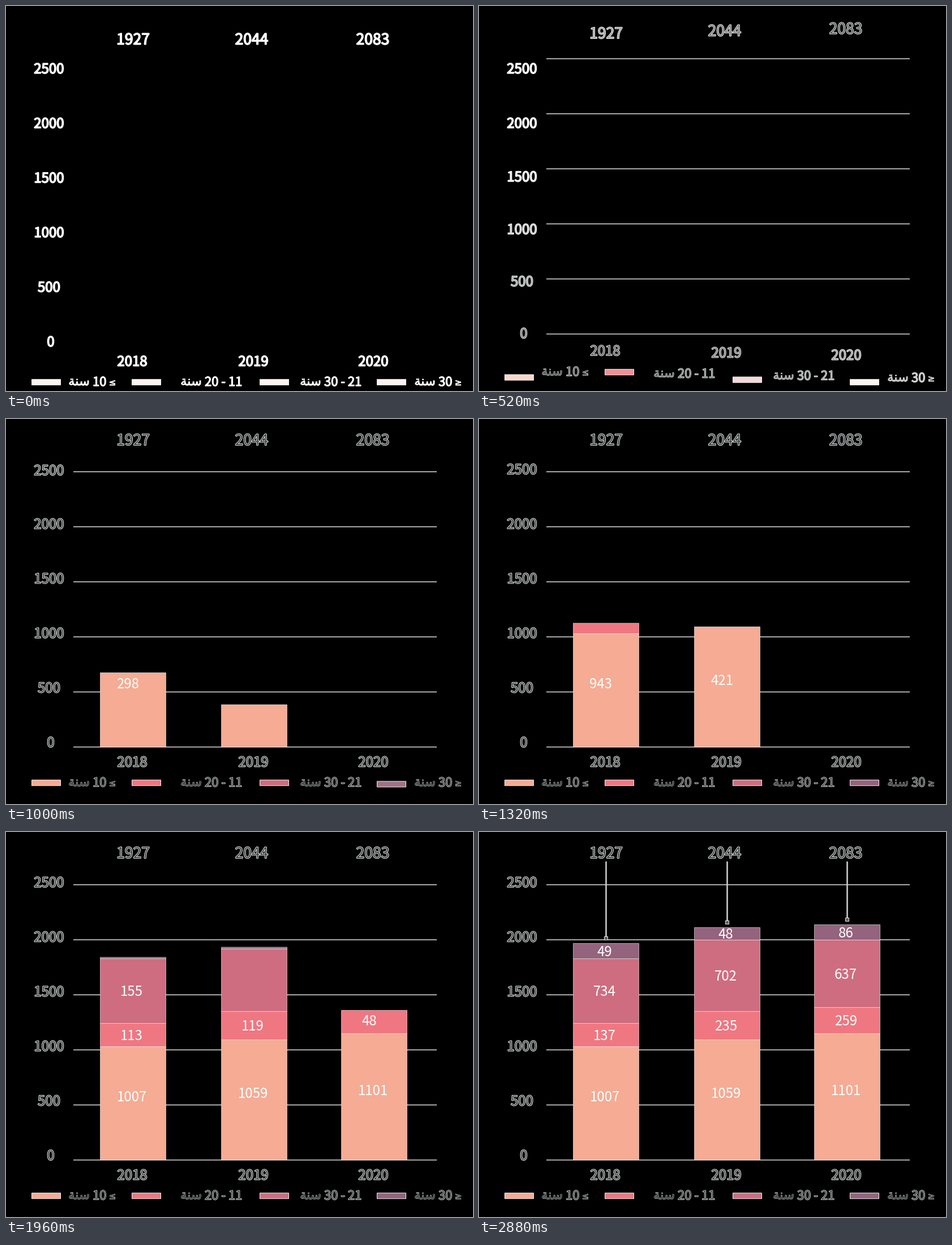
A matplotlib script for the animation above (3.88 s loop, 825 px wide and 679 px high).

```python
import matplotlib.pyplot as plt
from matplotlib.animation import FuncAnimation
from matplotlib.colors import to_rgb
from matplotlib.patches import Rectangle
from matplotlib.patheffects import withStroke
import numpy as np

W, H, DPI = 825, 679, 64
PX = 72 / DPI                  # points per pixel
STEP, FRAMES = 40, 97
RISE = 21.7                    # how far the captions slide up
BASE, GAP = 578.5, 97.1        # zero line and grid spacing
LATIN, ARABIC = "Noto Sans CJK JP", "DejaVu Sans"
YEARS = "\ufe94\ufee8\ufeb3"   # joined letter forms in visual order
INK = "#3e4343"
COLORS = ["#f5ab94", "#ef7781", "#cf6d80", "#94637d"]

fig = plt.figure(figsize=(W / DPI, H / DPI), dpi=DPI, facecolor="black")
ax = fig.add_axes([0, 0, 1, 1])
ax.set_xlim(0, W)
ax.set_ylim(H, 0)
ax.axis("off")


def ease(t, start, length):
    u = min(max((t - start) / length, 0), 1)
    return u * u * (3 - 2 * u)


def blend(a, b, p):
    return tuple((1 - p) * np.array(to_rgb(a)) + p * np.array(to_rgb(b)))


def stagger(first, last, power):
    """Four start times from first to last, bunched towards the end."""
    return first + (last - first) * (np.arange(4) / 3) ** power


def box(x, y, w, h, **style):
    return ax.add_patch(Rectangle((x, y), w, h, lw=PX, snap=False, **style))


def stroke(color, width, z):
    return ax.plot([], [], color=color, lw=width * PX, zorder=z,
                   solid_capstyle="butt", snap=False)[0]


class Grid:
    def __init__(self):
        self.lines = [stroke("#dedede", 1.5, 1) for _ in range(6)]

    def update(self, t):
        right = 119 + 642 * ease(t, 20, 500)
        for i, line in enumerate(self.lines):
            line.set_data([119, right], [BASE - GAP * i] * 2)
            line.set_visible(right > 119)


class Caption:
    """Outlined text that slides up while its fill darkens."""

    def __init__(self, x, mid, text, size, start, font=LATIN, ha="center", edge=1.7):
        self.y = mid + (size * 0.366 if font == LATIN else 7)
        self.start = start
        self.art = ax.text(
            x, self.y, text, family=font, size=size * PX, color="white",
            ha=ha, va="baseline", zorder=4,
            path_effects=[withStroke(linewidth=edge * PX, foreground="white")])

    def update(self, t):
        p = ease(t, self.start, 520)
        self.art.set_y(self.y - RISE * p)
        self.art.set_color(blend("white", INK, p))


class Swatch:
    """Legend key that slides up while it takes on its colour."""

    def __init__(self, x, color, start):
        self.y, self.color, self.start = 658.4, color, start
        self.art = box(x, self.y, 51, 10, ec="#f4eeee", zorder=4)

    def update(self, t):
        p = ease(t, self.start, 520)
        self.art.set_y(self.y - RISE * p)
        self.art.set_facecolor(blend("#fdf3f0", self.color, p))


class Bar:
    """Stack of segments growing one after another, each with a counter."""

    def __init__(self, x, heights, values, starts, counts):
        self.heights, self.values = heights, values
        self.starts, self.counts = starts, counts
        self.rects = [box(x, BASE, 116, 0, fc=c, ec=(1, 1, 1, 0.55), zorder=2)
                      for c in COLORS]
        mids = BASE - np.cumsum(heights) + np.array(heights) / 2
        mids[0] -= 12          # lowest counter sits above the middle
        self.labels = [
            ax.text(x + 55.5 - 6.65 * len(str(v)), mid + 8.8, "", family=LATIN,
                    size=24 * PX, color="white", va="baseline", zorder=5)
            for v, mid in zip(values, mids)]

    def update(self, t):
        y = BASE
        for r, full, start in zip(self.rects, self.heights, self.starts):
            h = full * ease(t, start, 400)
            y -= h
            r.set_y(y)
            r.set_height(h)
            r.set_visible(h > 0)
        for label, value, start in zip(self.labels, self.values, self.counts):
            u = min((t - start) / 500, 1)
            label.set_text(str(round(value * u)) if u > 0 else "")


class Pin:
    """Square foot with a stem growing up to the total."""

    def __init__(self, x, foot, start):
        self.x, self.foot, self.start = x, foot, start
        self.stem = stroke("#cccccc", 2.6, 3)
        self.square = box(x - 3, foot - 3, 6, 6, fc="#5a5e5e", ec="#e6e6e6", zorder=4)

    def update(self, t):
        p = ease(t, self.start, 400)
        self.stem.set_data([self.x] * 2, [self.foot, self.foot + (52 - self.foot) * p])
        self.stem.set_visible(p > 0)
        self.square.set_visible(p > 0)


parts = [Grid()]

for i in range(6):
    parts.append(Caption(79 if i == 0 else 76, 591.5 - 96.3 * i, str(500 * i),
                         24, 200 + 74 * i))

# legend: key x, words x, age range, key start
legend = [(45.5, 129, "10", 300), (222.5, 327, "20 - 11", 143),
          (448.5, 538, "30 - 21", 372), (655.5, 740, "30", 585)]
signs = {0: "\u2264", 3: "\u2265"}
for i, (key_x, x, ages, start) in enumerate(legend):
    delay = 143 + 60 * i
    parts.append(Swatch(key_x, COLORS[i], start))
    parts.append(Caption(x, 662, YEARS, 22.5, delay, ARABIC, edge=0.8))
    parts.append(Caption(x + 24, 662, ages, 22, delay, ha="left", edge=1.3))
    if i in signs:
        parts.append(Caption(x + 59, 662, signs[i], 15, delay, ARABIC, edge=0.8))

# bars: x, total x, segment heights, values, growth (first, last, power)
bars = [(166.5, 224.5, [200, 41, 114, 27], [1007, 137, 734, 49], (758, 1885, 1)),
        (380.5, 434, [212, 50, 126, 22], [1059, 235, 702, 48], (840, 1870, 0.6)),
        (592.5, 648, [223, 46, 119, 27], [1101, 259, 637, 86], (1320, 2285, 1))]
for i, (x, total_x, heights, values, growth) in enumerate(bars):
    counts = stagger(852 + 269 * i, 2095 + 75 * i, 0.53)
    parts += [
        Bar(x, heights, values, stagger(*growth), counts),
        Caption(total_x, 58, str(sum(values)), 26.5, 265 - 72 * i),
        Caption(x + 56.5, 626, str(2018 + i), 24, 125 + 67 * i),
        Pin(x + 58, BASE - sum(heights) - 9, 2300 + 90 * i),
    ]


def draw(frame):
    for part in parts:
        part.update(frame * STEP)
    return []


anim = FuncAnimation(fig, draw, frames=FRAMES, interval=STEP,
                     repeat=True, repeat_delay=0)
plt.show()
```
